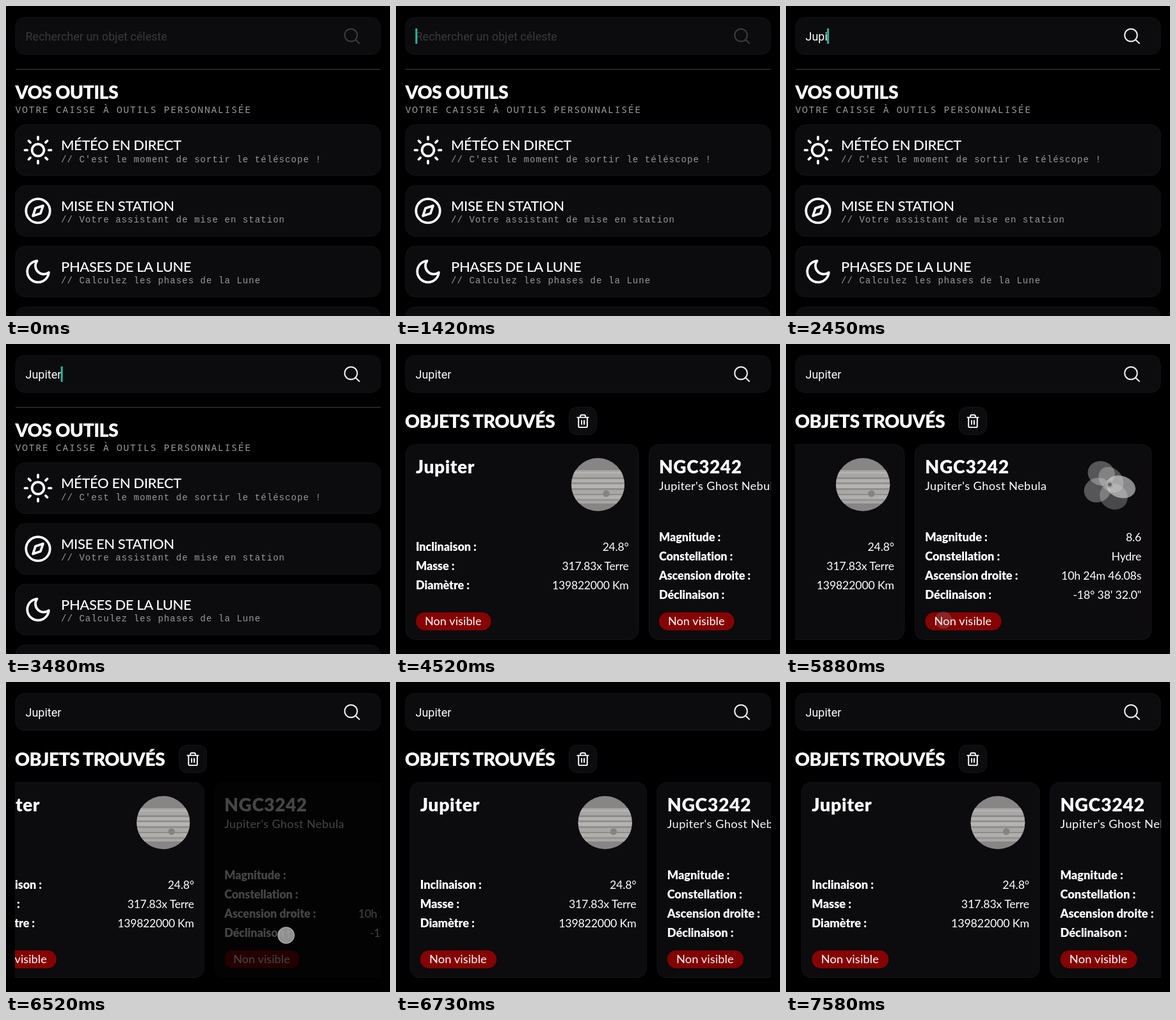
An HTML page for the animation above (7610 ms loop, 600 px wide and 484 px high).

```html
<!DOCTYPE html>
<html lang="fr">
<head>
<meta charset="utf-8">
<title>Recherche céleste</title>
<style>
  html, body { margin: 0; width: 100%; height: 100%; overflow: hidden; background: #000; }
  svg { display: block; width: 100vw; height: 100vh; }
  text { fill: #fff; font-family: Lato, sans-serif; white-space: pre; }
  .panel { fill: #0c0b0e; stroke: #151418; }
  .icon { fill: none; stroke: #fff; stroke-width: 2; stroke-linecap: round; stroke-linejoin: round; }
  .input { font: 18px Roboto, sans-serif; }
  .heading { font-size: 28.5px; font-weight: 900; letter-spacing: -.6px; }
  .lead { font: 500 15px "Noto Sans Mono", monospace; letter-spacing: 1.55px; fill: #999; }
  .tool { font-size: 22px; font-weight: 500; letter-spacing: -.4px; }
  .note { font: 14px "Liberation Mono", monospace; letter-spacing: 1.06px; fill: #999; }
  .name { font-size: 28px; font-weight: 900; letter-spacing: .6px; }
  .label { font-size: 18px; font-weight: 900; letter-spacing: -.1px; }
  .value { font-size: 17.5px; letter-spacing: -.2px; text-anchor: end; }
  .sub { font-size: 18px; letter-spacing: .4px; }
  .pill { font-size: 18px; letter-spacing: .1px; }
</style>
</head>
<body>
<svg viewBox="0 0 600 484">
  <defs>
    <clipPath id="viewport"><rect x="14" y="150" width="572" height="334"/></clipPath>
    <clipPath id="disc"><circle cx="315.5" cy="219.5" r="41.5"/></clipPath>
  </defs>
  <rect class="panel" x="15" y="18" width="570" height="57.5" rx="14"/>
  <text id="query" class="input" x="30.5" y="54"></text>
  <rect id="caret" y="35" width="3" height="24" fill="#22b89b"/>
  <g id="lens" class="icon" stroke-width="2.4">
    <circle cx="539" cy="45.5" r="9.8"/><path d="M546.2 52.7L552 58.3"/>
  </g>
  <g id="tools"></g>
  <g id="results">
    <text class="heading" x="14" y="131">OBJETS TROUVÉS</text>
    <rect class="panel" x="270.5" y="98.5" width="43" height="43" rx="12"/>
    <path class="icon" transform="translate(280.4 108.8) scale(.97)"
      d="M3 6H21M19 6v14a2 2 0 0 1-2 2H7a2 2 0 0 1-2-2V6M8 6V4a2 2 0 0 1 2-2h4a2 2 0 0 1 2 2v2M10 11v6M14 11v6"/>
    <g clip-path="url(#viewport)"><g id="track"></g></g>
  </g>
  <circle id="pointer" r="12.5" fill="#aaa" stroke="#c4c4c4" stroke-width="1.5"/>
</svg>
<script>
const LOOP = 7610;
const WORD = 'Jupiter';
const TYPE_START = 1580, TYPE_STEP = 255;
const CARET_ON = 1200, CARET_OFF = 3640, FOUND = 4050;
const $ = id => document.getElementById(id);
const text = (cls, x, y, str) => `<text class="${cls}" x="${x}" y="${y}">${str}</text>`;

// Tool list
const rays = Array.from({length: 8}, (_, i) =>
  `<path d="M12 1V3" transform="rotate(${i * 45} 12 12)"/>`).join('');
const tools = [
  ['MÉTÉO EN DIRECT', "C'est le moment de sortir le téléscope !",
    `<circle cx="12" cy="12" r="5"/>${rays}`],
  ['MISE EN STATION', 'Votre assistant de mise en station',
    '<circle cx="12" cy="12" r="10"/><path d="M16.24 7.76L14.12 14.12 7.76 16.24 9.88 9.88Z"/>'],
  ['PHASES DE LA LUNE', 'Calculez les phases de la Lune',
    '<path d="M21 12.79A9 9 0 1 1 11.21 3 7 7 0 0 0 21 12.79Z"/>'],
  ['', '', '']
];
$('tools').innerHTML =
  '<path d="M15 99H585" stroke="#484848"/>' +
  text('heading', 14.5, 144.5, 'VOS OUTILS') +
  text('lead', 14.5, 166.5, 'VOTRE CAISSE À OUTILS PERSONNALISÉE') +
  tools.map(([title, note, icon], i) => {
    const y = 185.5 + i * 94.8;
    return `<rect class="panel" x="15" y="${y}" width="570" height="79" rx="15"/>` +
      `<g class="icon" transform="translate(50 ${y + 39.5}) scale(1.87) translate(-12 -12)">${icon}</g>` +
      (title && text('tool', 86, y + 39.5, title) + text('note', 86, y + 58, '// ' + note));
  }).join('');

// Result cards
const bands = [[197, 11, '#a9a6a6'], [200, 2, '#b8b5b5'], [208, 3, '#8e8b8b'], [211, 5, '#b3b0b0'],
  [216, 3, '#939090'], [219, 6, '#b6b3b3'], [225, 3, '#918e8e'], [228, 6, '#aaa7a7'],
  [234, 2, '#8e8b8b'], [236, 6, '#b1aeae'], [242, 3, '#959292'], [245, 4, '#a9a6a6']];
const planet = '<g clip-path="url(#disc)"><rect x="270" y="175" width="90" height="90" fill="#878585"/>' +
  bands.map(([y, h, c]) => `<rect x="270" y="${y}" width="90" height="${h}" fill="${c}"/>`).join('') +
  '<circle cx="328.5" cy="233.5" r="5.2" fill="#858282"/></g>';

const lobes = [[682, 202, 21, 19, 20, .36], [676, 228, 21, 19, -25, .36], [701, 238, 22, 20, 30, .3],
  [697, 212, 22, 17, 50, .34], [712, 223, 23, 17, 18, .62]];
const nebula = lobes.map(([x, y, rx, ry, turn, alpha]) =>
  `<ellipse cx="${x}" cy="${y}" rx="${rx}" ry="${ry}" transform="rotate(${turn} ${x} ${y})" fill="#d8d8d8" opacity="${alpha}"/>`).join('') +
  '<circle cx="695" cy="219.5" r="6" fill="#aaa"/><circle cx="695" cy="219.5" r="3" fill="#666"/>';

const card = (id, x, name, sub, rows, firstRow, art) => `<g id="${id}">
  <rect class="panel" x="${x + .5}" y="157" width="363.5" height="304.5" rx="15"/>
  ${text('name', x + 16, 202, name)}${text('sub', x + 16, 228, sub)}${art}
  ${rows.map(([label, value], i) => text('label', x + 16, firstRow + i * 30.1, label + ' :') +
    text('value', x + 348.5, firstRow + i * 30.1, value)).join('')}
  <rect x="${x + 16}" y="419" width="117.5" height="28" rx="14" fill="#850303"/>
  ${text('pill', x + 30, 439, 'Non visible')}</g>`;
$('track').innerHTML =
  card('first', 15, 'Jupiter', '', [['Inclinaison', '24.8°'], ['Masse', '317.83x Terre'],
    ['Diamètre', '139822000 Km']], 322.8, planet) +
  card('second', 395, 'NGC3242', "Jupiter's Ghost Nebula", [['Magnitude', '8.6'], ['Constellation', 'Hydre'],
    ['Ascension droite', '10h 24m 46.08s'], ['Déclinaison', '-18° 38\' 32.0"']], 308, nebula);

// Each row: time, then the values reached at that time
const scroll = [[5625, 15, 1], [5700, -40, 1], [5810, -173, 1], [5880, -185.3, 1.0165], [6120, -173, 1],
  [6410, -173, 1], [6520, -55.5, 1], [6620, 15, 1], [6740, 22, 1.017], [6940, 15, 1],
  [7300, 15, 1], [7500, 24, 1.0215], [7610, 24, 1.0215]];
const press = [[5540, 1], [5600, .22], [5650, .22], [5820, 1], [6390, 1], [6440, .27], [6530, .27], [6740, 1]];
const touch = [[5540, 394, 419, 0], [5590, 394, 419, .92], [5625, 394, 419, .92], [5840, 250, 431, .92],
  [5880, 246, 431, .2], [5910, 246, 431, 0], [6360, 320, 400, 0], [6400, 320, 400, .85],
  [6520, 437, 395.5, .85], [6620, 505, 392, .85], [6690, 520, 391, 0]];
const reveal = [[FOUND, 0], [FOUND + 450, 1]];

function sample(steps, t) {
  const next = steps.findIndex(s => s[0] > t);
  if (next === 0) return steps[0].slice(1);
  if (next < 0) return steps[steps.length - 1].slice(1);
  const a = steps[next - 1], b = steps[next], k = (t - a[0]) / (b[0] - a[0]);
  return a.slice(1).map((v, i) => v + (b[i + 1] - v) * k);
}

function render(t) {
  const typed = Math.max(0, Math.min(WORD.length, Math.floor((t - TYPE_START) / TYPE_STEP) + 1));
  const query = $('query');
  query.textContent = typed ? WORD.slice(0, typed) : 'Rechercher un objet céleste';
  query.style.fill = typed ? '#fff' : '#39393b';
  $('lens').style.stroke = typed ? '#f2f2f2' : '#3d3d40';
  $('caret').setAttribute('x', 30.3 + (typed ? query.getComputedTextLength() - .5 : 0));
  $('caret').style.opacity = +(t >= CARET_ON && t < CARET_OFF);

  $('tools').style.display = t < FOUND ? '' : 'none';
  $('results').style.opacity = sample(reveal, t)[0];
  const [left, stretch] = sample(scroll, t);
  $('track').setAttribute('transform', `translate(${left} 0) scale(${stretch} 1) translate(-15 0)`);
  $('second').style.opacity = sample(press, t)[0];

  const [x, y, alpha] = sample(touch, t);
  $('pointer').setAttribute('transform', `translate(${x} ${y})`);
  $('pointer').style.opacity = alpha;
}

const start = performance.now();
function tick() {
  render((performance.now() - start) % LOOP);
  requestAnimationFrame(tick);
}
tick();
</script>
</body>
</html>
```
